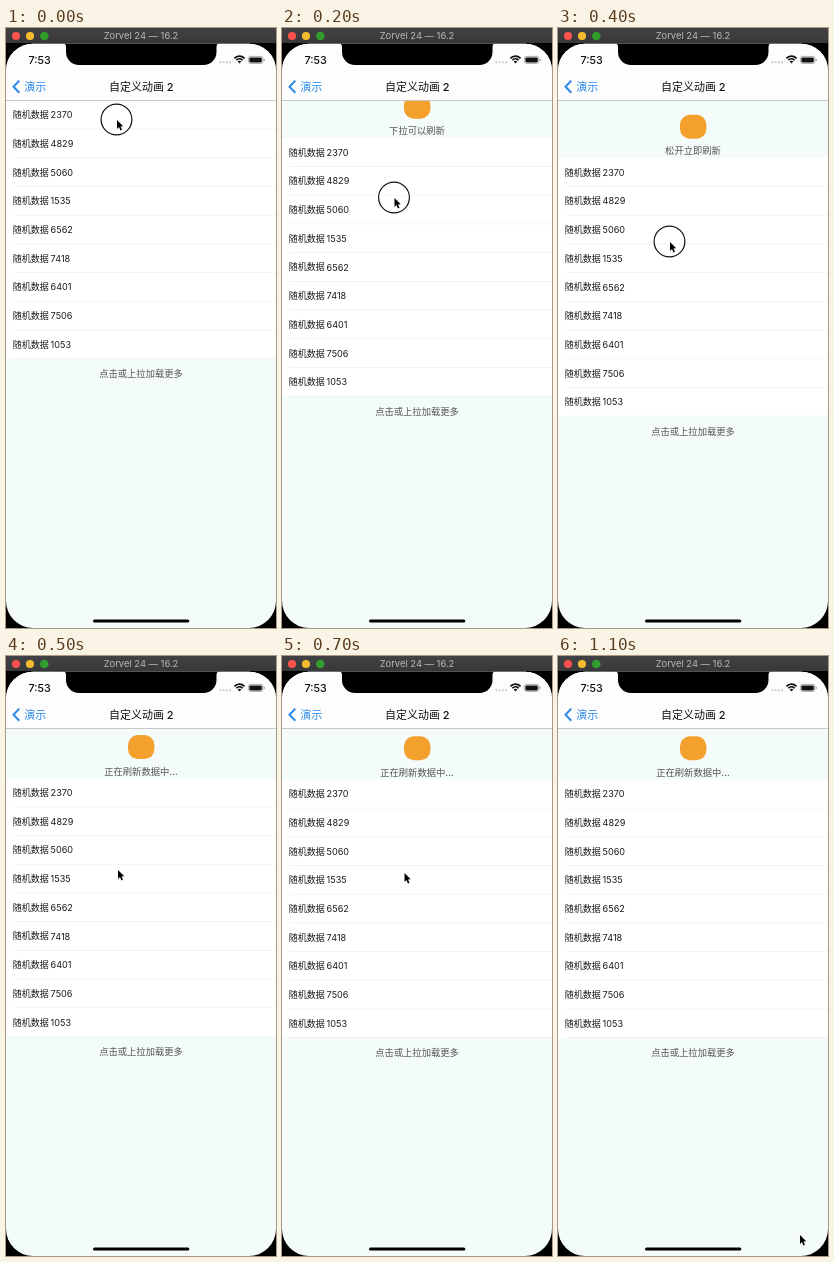
Animation of 270x600 px, one loop 1200 ms. Source, as an HTML page with a canvas:

```html
<!DOCTYPE html>
<html lang="zh">
<head>
<meta charset="utf-8">
<style>
html, body { margin: 0; width: 100%; height: 100%; overflow: hidden; background: #000; }
canvas { display: block; width: 270px; height: 600px; }
</style>
</head>
<body>
<canvas id="stage"></canvas>
<script>
const W = 270, H = 600, LOOP = 1200, STEP = 100;
const NAV_BOTTOM = 72.5, ROW_H = 28.7;
const FONT = '"Inter", "Noto Sans CJK SC", "Noto Sans CJK", sans-serif';
const INK = '#1a1a1a', GREY = '#555', BLUE = '#2a89ea';
const rows = [2370, 4829, 5060, 1535, 6562, 7418, 6401, 7506, 1053];

// time, pull distance, pointer x, pointer y
const keys = [
  [0, 0, 110.5, 91.5],
  [100, 17, 111.5, 130],
  [200, 37.5, 112, 169.5],
  [300, 40.3, 112, 197],
  [400, 57.5, 111.5, 213.5],
  [500, 49.8, 111.5, 213.5],
  [600, 51, 113, 214],
  [700, 51, 122, 216.5]
];
const exit = { from: 700, to: 1100, x: 241.5, y: 578.5 };

const canvas = document.getElementById('stage');
const ctx = canvas.getContext('2d');
const dpr = window.devicePixelRatio || 1;
canvas.width = W * dpr;
canvas.height = H * dpr;

function text(str, x, cy, size, color, weight = 400, align = 'left') {
  ctx.font = `${weight} ${size}px ${FONT}`;
  ctx.textAlign = align;
  ctx.fillStyle = color;
  ctx.fillText(str, x, cy + size * 0.37);
}

function rect(x, y, w, h, color) {
  ctx.fillStyle = color;
  ctx.fillRect(x, y, w, h);
}

function round(x, y, w, h, r, color) {
  ctx.beginPath();
  ctx.roundRect(x, y, w, h, r);
  ctx.fillStyle = color;
  ctx.fill();
}

function dot(x, y, r, color) {
  ctx.beginPath();
  ctx.arc(x, y, r, 0, Math.PI * 2);
  ctx.fillStyle = color;
  ctx.fill();
}

function poseAt(t) {
  if (t <= exit.from) {
    const [, pull, x, y] = keys[Math.round(t / STEP)];
    return { pull, x, y };
  }
  const [, pull, x, y] = keys[keys.length - 1];
  const p = Math.min(1, (t - exit.from) / (exit.to - exit.from));
  const e = p * p * (3 - 2 * p);
  return { pull, x: x + (exit.x - x) * e, y: y + (exit.y - y) * e };
}

function drawTitleBar() {
  const g = ctx.createLinearGradient(0, 0, 0, 15);
  g.addColorStop(0, '#424245');
  g.addColorStop(1, '#38383b');
  rect(0, 0, W, 15, g);
  dot(10, 8, 4.1, '#f9524c');
  dot(24, 8, 4.1, '#f5bd2e');
  dot(38.3, 8, 4.3, '#319c2c');
  text('Zorvel 24 — 16.2', 135, 8, 9.4, '#b8b8ba', 400, 'center');
}

function drawStatus() {
  text('7:53', 22.5, 32, 10.8, '#111', 500);
  for (let i = 0; i < 4; i++) dot(214.3 + i * 3.3, 34.2, 1, '#c4c4c4');

  ctx.strokeStyle = '#111';
  ctx.lineWidth = 1.8;
  for (const r of [4.3, 7]) {
    ctx.beginPath();
    ctx.arc(233.5, 35.2, r, -Math.PI * 0.76, -Math.PI * 0.24);
    ctx.stroke();
  }
  ctx.beginPath();
  ctx.moveTo(233.5, 35.4);
  ctx.arc(233.5, 35.4, 2.6, -Math.PI * 0.75, -Math.PI * 0.25);
  ctx.fillStyle = '#111';
  ctx.fill();

  ctx.beginPath();
  ctx.roundRect(242.4, 28.4, 14.4, 7, 2);
  ctx.strokeStyle = '#888';
  ctx.lineWidth = 0.7;
  ctx.stroke();
  round(243.4, 29.4, 12.4, 5, 1.1, '#111');
  round(257.6, 30.7, 1, 2.4, 0.5, '#888');
}

function drawNav() {
  rect(0, 15, W, NAV_BOTTOM - 15, '#fdfdfd');
  rect(0, 72, W, 1, '#c6c8c9');
  ctx.beginPath();
  ctx.moveTo(13.3, 52.6);
  ctx.lineTo(7.5, 58.7);
  ctx.lineTo(13.3, 64.8);
  ctx.strokeStyle = BLUE;
  ctx.lineWidth = 2;
  ctx.stroke();
  text('演示', 18.2, 58.5, 11, BLUE);
  text('自定义动画', 103, 58.5, 11, '#111', 500);
  text('2', 160.7, 58.5, 11, '#111', 500);
}

function drawNotch() {
  const left = 60, right = 210.5, top = 15, bottom = 37, r = 13, flare = 4;
  ctx.beginPath();
  ctx.moveTo(left - flare, top);
  ctx.arcTo(left, top, left, bottom, flare);
  ctx.arcTo(left, bottom, right, bottom, r);
  ctx.arcTo(right, bottom, right, top, r);
  ctx.arcTo(right, top, right + flare, top, flare);
  ctx.lineTo(right + flare, top);
  ctx.closePath();
  ctx.fillStyle = '#000';
  ctx.fill();
}

function drawList(t, pull) {
  const top = NAV_BOTTOM + pull;
  const bottom = top + rows.length * ROW_H;
  rect(0, 0, W, H, '#f4fbfb');

  if (pull > 0) {
    const label = t < 400 ? '下拉可以刷新' : t < 500 ? '松开立即刷新' : '正在刷新数据中...';
    round(122, top - 43.2, 26.4, 24, 10, '#f3a02c');
    text(label, 135, top - 7, 9.3, GREY, 500, 'center');
  }

  rect(0, top, W, bottom - top, '#fff');
  rows.forEach((n, i) => {
    const y = top + i * ROW_H;
    const cy = y + ROW_H / 2;
    text('随机数据', 6.7, cy, 9.05, INK);
    text(n, 44.6, cy, 9.1, INK);
    rect(6.5, y + ROW_H - 0.5, W - 6.5, 0.7, '#efefef');
  });
  text('点击或上拉加载更多', 135, bottom + 15, 9.3, GREY, 500, 'center');
}

function drawPointer(x, y, pressed) {
  if (pressed) {
    ctx.beginPath();
    ctx.arc(x, y, 15.4, 0, Math.PI * 2);
    ctx.strokeStyle = '#111';
    ctx.lineWidth = 1.2;
    ctx.stroke();
  }
  const shape = [[0, 0], [0, 8.9], [2, 7.1], [3.4, 10.4], [5, 9.7], [3.5, 6.5], [6.2, 6.3]];
  ctx.beginPath();
  shape.forEach(([dx, dy]) => ctx.lineTo(x + 0.5 + dx, y + 0.5 + dy));
  ctx.closePath();
  ctx.strokeStyle = '#fff';
  ctx.lineWidth = 1.4;
  ctx.stroke();
  ctx.fillStyle = '#000';
  ctx.fill();
}

function draw(t) {
  const pose = poseAt(t);
  ctx.setTransform(dpr, 0, 0, dpr, 0, 0);
  rect(0, 0, W, H, '#000');
  ctx.save();
  ctx.beginPath();
  ctx.roundRect(0, 15.7, W, H - 15.7, 27);
  ctx.clip();
  drawList(t, pose.pull);
  drawNav();
  drawStatus();
  drawNotch();
  round(87, 591.5, 96.3, 3, 1.5, '#000');
  ctx.restore();
  drawTitleBar();
  drawPointer(pose.x, pose.y, t < 500);
}

const start = performance.now();
function tick() {
  const t = (performance.now() - start) % LOOP;
  draw(Math.floor(t / STEP) * STEP);
  requestAnimationFrame(tick);
}
tick();
</script>
</body>
</html>
```
